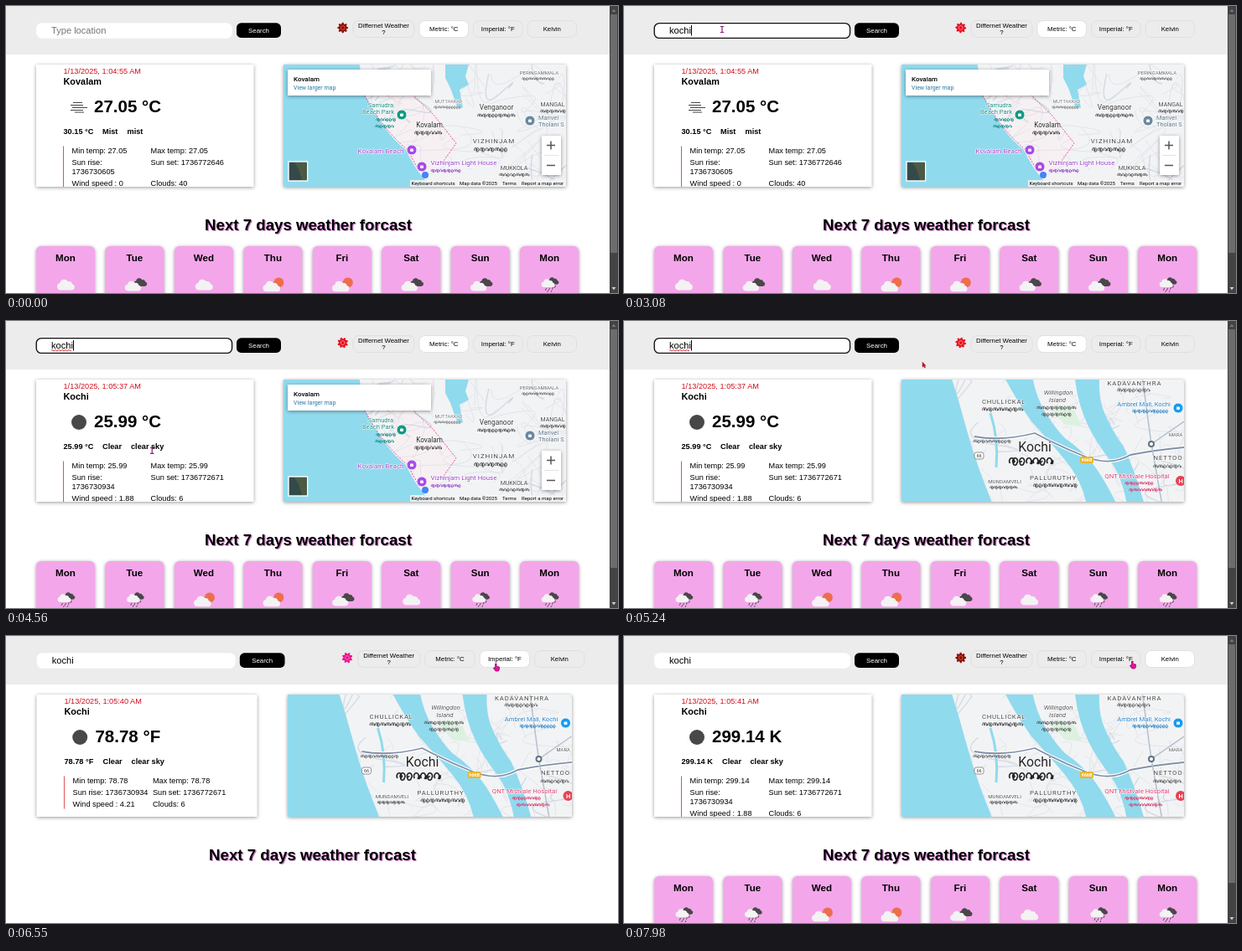
Animation of 730x343 px, one loop 8 s. Source, as an HTML page:

```html
<!DOCTYPE html>
<html lang="en">
<head>
<meta charset="utf-8">
<title>Weather dashboard</title>
<style>
html, body { margin: 0; width: 100%; height: 100%; overflow: hidden; background: #fff; }
svg { display: block; font-family: "Liberation Sans", Arial, sans-serif; }
.card { filter: drop-shadow(0 1px 2px rgba(0,0,0,.4)); }
.map text { font-family: Roboto, sans-serif; }
.halo text { paint-order: stroke; stroke: #fff; stroke-width: 1.2px; stroke-linejoin: round; }
</style>
</head>
<body>
<svg width="730" height="343" viewBox="0 0 730 343">
  <defs><clipPath id="weatherClip"><rect x="30" y="60" width="280" height="156"/></clipPath></defs>
  <g id="scene"></g>
  <g id="sun"></g>
  <g id="cursor"></g>
</svg>
<script>
const LOOP = 8000;
const $ = id => document.getElementById(id);
const DAYS = ['Mon', 'Tue', 'Wed', 'Thu', 'Fri', 'Sat', 'Sun', 'Mon'];

// ---- drawing helpers ----
const text = (x, y, str, size, extra = '') => `<text x="${x}" y="${y}" font-size="${size}" ${extra}>${str}</text>`;
const rect = (x, y, w, h, fill, extra = '') => `<rect x="${x}" y="${y}" width="${w}" height="${h}" fill="${fill}" ${extra}/>`;
const dot = (x, y, r, fill, extra = '') => `<circle cx="${x}" cy="${y}" r="${r}" fill="${fill}" ${extra}/>`;
const line = (d, color, width = 1, extra = '') => `<path d="${d}" fill="none" stroke="${color}" stroke-width="${width}" ${extra}/>`;
const shape = (d, fill, extra = '') => `<path d="${d}" fill="${fill}" ${extra}/>`;
const BOLD = 'font-weight="700"', MID = 'text-anchor="middle"';

function random(seed) {
  return () => (seed = (seed * 16807) % 2147483647) / 2147483647;
}

// Rounded looping script, used for the second language of the map labels
function curls(x, y, w, h = 4, color = '#555') {
  const rnd = random(Math.round(x * 31 + y * 7));
  const r = h / 2.7;
  let d = '';
  for (let px = x - w / 2; px < x + w / 2 - r * 2;) {
    const arches = rnd() < .5 ? 2 : 1;
    d += `M${px} ${y}`;
    for (let i = 0; i < arches; i++) d += `a${r * .75} ${r} 0 1 1 ${r * 1.1} 0`;
    d += rnd() < .6 ? `a${r * .6} ${r * .6} 0 1 1 ${-r * .5} ${-r * .6}` : `q${r * .7} ${r * .5} ${r * .6} ${-r}`;
    px += r * (arches * 1.1 + 1.1);
  }
  return line(d, color, Math.max(.8, h * .16));
}

function label(x, y, str, size, color = '#444', extra = '') {
  return text(x, y, str, size, `${MID} fill="${color}" ${extra}`);
}

function roads(seed, count, color, width) {
  const rnd = random(seed);
  let d = '';
  for (let i = 0; i < count; i++) {
    const step = () => (rnd() - .5) * 60;
    d += `M${330 + rnd() * 350} ${65 + rnd() * 155}q${step()} ${step()} ${step()} ${step()}t${step()} ${step()}`;
  }
  return line(d, color, width);
}

function pin(x, y, color, r = 6) {
  return dot(x, y, r, color, 'stroke="#fff" stroke-width=".8"') + rect(x - 2, y - 1.5, 4, 3.5, '#fff', 'rx="1"');
}

// ---- maps ----
const WATER = '#90daee';
const PURPLE = '#9b45c9', TEAL = '#168c83';
const land = rect(320, 60, 370, 160, '#f2f3f5');

const kovalamMap = land +
  shape('M455 107L482 103 510 130 537 164 520 190 500 205 470 170Z', '#f7f0f3') +
  roads(41, 75, '#e0e3e8', .9) + roads(8, 14, '#d3d9e1', 1.4) +
  shape('M320 60H420L428 107Q440 130 452 146T477 172Q488 195 497 204L508 220H320Z', WATER) +
  shape('M524 66H553L548 84 552 94 541 100 545 122 538 120 530 98 524 86Z', WATER) +
  line('M428 107Q442 133 455 148T479 172L492 196M455 107L482 103 510 130 537 164 520 188', '#e33f91', .9, 'stroke-dasharray="2 1.5"') +
  '<g class="halo">' +
  label(505, 145, 'Kovalam', 8.2, '#222') + curls(505, 153, 34, 5, '#333') +
  label(528, 116, 'MUTTAKKAD', 5.6, '#777') + curls(528, 122, 34, 3.6, '#888') +
  label(636, 82, 'PERINGAMMALA', 6, '#666') + curls(636, 88, 40, 3.8, '#777') +
  label(585, 124, 'Venganoor', 8.4, '#333') + curls(585, 132, 44, 4.6, '#444') +
  label(582, 164, 'VIZHINJAM', 8, '#444', 'letter-spacing=".9"') + curls(581, 173, 44, 5.5, '#333') +
  label(652, 120, 'MANGAL', 7) + curls(653, 127, 30, 4.4) +
  label(606, 196, 'MUKKOLA', 7) + curls(606, 203, 34, 4.4) +
  text(635, 136, 'Marivel', 7.4, 'fill="#587185"') + text(635, 144, 'Tholani S', 7.4, 'fill="#587185"') +
  label(447, 121, 'Samudra', 7.6, TEAL) + label(444, 129, 'Beach Park', 7.6, TEAL) +
  curls(453, 137, 22, 4.2, TEAL) + curls(453, 145, 24, 4.2, TEAL) +
  label(447, 176, 'Kovalam Beach', 8, PURPLE) +
  label(546, 190, 'Vizhinjam Light House', 7.9, PURPLE) + curls(526, 198, 37, 4.2, PURPLE) +
  '</g>' +
  pin(472, 130, '#129a83') + pin(484, 172, '#a94be6') + pin(496, 192, '#a94be6') + pin(625, 137, '#6b899e') +
  dot(500, 202, 4, '#4285f4') +
  rect(336, 76, 171, 31, '#fff', 'class="card"') +
  text(343, 90, 'Kovalam', 8, 'font-weight="500"') +
  text(343, 100, 'View larger map', 7, 'fill="#2377a8"') +
  rect(639, 155, 23, 47, '#fff', 'class="card"') +
  line('M645 166.5h10M650 161.5v10M645 190.5h10', '#555', 1.5) + line('M642 178.5h17', '#e2e2e2') +
  rect(337, 186, 22.5, 23, '#34494a', 'stroke="#fff" stroke-width="1.4"') +
  shape('M344 187l5 8 4 13h6v-21z', '#4c5a43') +
  rect(482, 208, 190, 9, '#f5f5f5', 'opacity=".85"') +
  text(483.5, 214, 'Keyboard shortcuts', 6) + text(541, 214, 'Map data ©2025', 6) +
  text(592, 214, 'Terms', 6) + text(615, 214, 'Report a map error', 6);

const highway = 'M418 138Q450 144 490 134Q520 150 550 162T604 160Q640 153 680 150';
const kochiMap = land +
  roads(77, 70, '#e1e4e9', .9) + roads(19, 12, '#d6dce4', 1.4) +
  shape('M320 60H388Q398 90 406 120T424 178L440 220H320Z', WATER) +
  shape('M450 60H486Q490 88 502 108T526 140Q552 158 566 180T588 220H552Q546 190 526 166T486 120Q466 92 450 60Z', WATER) +
  shape('M537 60H568Q564 90 574 112T596 150Q610 180 621 220H600Q594 185 578 164T554 126Q540 98 537 60Z', WATER) +
  shape('M508 104q16-8 30 4l8 18-20-2z', '#dcf1df') +
  line('M437 110Q447 140 444 175', WATER, 3) +
  line(highway, '#fff', 4) + line(highway, '#7f91a8', 1.8) +
  line('M629 147L642 220M618 66L629 147 668 120', '#b4c0ce', 1.5) +
  '<g class="halo">' +
  label(453, 99, 'CHULLICKAL', 7.8, '#444', 'letter-spacing=".65"') + curls(454, 107, 52, 5.2, '#333') +
  label(609, 77, 'KADAVANTHRA', 7.8, '#444', 'letter-spacing=".9"') + curls(609, 84, 40, 4.8) +
  label(518, 88, 'Willingdon', 7.7, '#555', 'font-style="italic"') + label(517, 97, 'Island', 7.7, '#555', 'font-style="italic"') +
  curls(516, 105, 46, 4.6) + curls(517, 113, 36, 4.6) +
  label(490, 155.5, 'Kochi', 15.8, '#222') + curls(488, 170, 55, 10, '#222') +
  curls(439, 145, 44, 4.3, '#666') +
  label(512, 189.5, 'PALLURUTHY', 7.8, '#444', 'letter-spacing=".85"') + curls(515, 198, 52, 5.2, '#333') +
  label(454, 193.5, 'MUNDAMVELI', 6.2, '#555') + curls(454, 200, 34, 4) +
  label(649, 166, 'NETTOO', 7.8, '#444', 'letter-spacing=".8"') + curls(650, 175, 36, 4.8) +
  text(650, 138, 'MARA', 5.8, 'fill="#555"') +
  label(620, 102, 'Ambrel Mall, Kochi', 7.7, '#2680c4') + curls(630, 109, 46, 4.4, '#2680c4') +
  label(612, 188, 'QNT Mistvale Hospital', 7.8, '#dc3d72') + curls(616, 195, 36, 4.2, '#dc3d72') + curls(624, 203, 42, 4.2, '#dc3d72') +
  '</g>' +
  rect(418, 157, 11, 8, '#fff', 'rx="2.5" stroke="#777" stroke-width=".8"') + label(423.5, 163, '66', 5.5, '#333') +
  rect(544, 162, 16, 8, '#eab429', 'rx="2"') + label(552, 168, '966B', 5.5, '#fff', BOLD) +
  dot(629, 147, 4, '#62717f') + dot(629, 147, 2, '#fff') +
  pin(661, 104, '#169cf0') + dot(664, 191, 6, '#ea4052') + text(661.5, 194, 'H', 7.5, `${BOLD} fill="#fff"`);

// ---- weather icons, centred on 0,0 ----
const cloud = (x, y, scale, fill) =>
  shape('M-6.5 6.5a4.3 4.3 0 0 1-.6-8.5a5.2 5.2 0 0 1 9.6-1.8a3.8 3.8 0 0 1 5 3a3.7 3.7 0 0 1-.8 7.3z', fill,
    `transform="translate(${x} ${y}) scale(${scale})"`);
const ICONS = {
  cloud: cloud(0, 0, 1, '#f3f3f3'),
  broken: cloud(6.5, -3, .75, '#484848') + cloud(-2.5, 1.5, .92, '#f3f3f3'),
  few: dot(6.5, -2.5, 6, '#ec6e4c') + cloud(-2, 2, .98, '#f3f3f3'),
  rain: cloud(4, -4.5, .66, '#484848') + cloud(-2, -2, .75, '#f3f3f3') +
    line('M-4 4l-1.3 3M0 4l-1.3 3M4 3l-1.3 3M7 1l-1.3 3M-2 7l-1 2M2.5 7l-1 2', '#555', 1)
};
const KOVALAM_DAYS = ['cloud', 'broken', 'cloud', 'few', 'few', 'broken', 'broken', 'rain'];
const KOCHI_DAYS = ['rain', 'rain', 'few', 'few', 'broken', 'cloud', 'rain', 'rain'];

// ---- readings, from the time each one arrives ----
const kochi = (at, clock, temp, wind, gap) => ({
  at, clock, temp, wind, gap, place: 'Kochi', feels: temp, sky: ['Clear', 'clear sky'],
  rise: 1736730934, set: 1736772671, clouds: 6, days: KOCHI_DAYS
});
const READINGS = [
  { at: 0, clock: '1:04:55', place: 'Kovalam', temp: '27.05 °C', feels: '30.15 °C', wind: 0, sky: ['Mist', 'mist'],
    gap: [115, 144.5], rise: 1736730605, set: 1736772646, clouds: 40, days: KOVALAM_DAYS },
  kochi(3760, '1:05:37', '25.99 °C', 1.88, [115, 149]),
  kochi(6100, '1:05:40', '78.78 °F', 4.21, [114, 147.5]),
  kochi(7460, '1:05:41', '299.14 K', 1.88, [117, 150.5])
];
const LOADING = [[3610, 4100], [6030, 6620], [7380, 7750]];
const KEYS = [2390, 2640, 2770, 2900, 3080];
const since = (t, times) => times.filter(at => t >= at).length;

function stateAt(t) {
  return {
    reading: since(t, READINGS.map(r => r.at)) - 1,
    wide: LOADING.some(([from, to]) => t >= from && t < to),
    typed: 'kochi'.slice(0, since(t, KEYS)),
    focus: t >= 1390 && t < 5860,
    caret: t < 1930 || t >= 2390,
    misspelt: t >= 3700 && t < 5860,
    unit: since(t, [5860, 7300]),
    moved: t >= 4800
  };
}

function header(s, X) {
  let out = rect(0, 0, 730, 58, '#ececec');
  out += s.focus
    ? rect(X(36.2), 20.6, X(233.4), 17.8, '#fff', 'rx="6" stroke="#111" stroke-width="1.4"')
    : rect(X(36), 20.2, X(234), 18.5, '#fff', 'rx="7"');
  out += s.typed ? text(X(54), 33, s.typed, 11.1) : text(X(54), 33, 'Type location', 11.1, 'fill="#757575"');
  if (s.misspelt) out += line(`M${X(54)} 35.2` + 'q1 -1.6 2 0t2 0'.repeat(6), '#d3202e', .9);
  if (s.focus && s.caret) out += rect(X(54) + [0, 5.6, 11.7, 17.3, 23.5, 26][s.typed.length], 23, 1, 12.5, '#000');
  out += rect(X(275), 20.3, X(53), 17.6, '#000', 'rx="5.5"') + text(X(301.5), 32, 'Search', 7.9, `${MID} fill="#fff"`);
  const button = (x, w, active, ...rows) => rect(X(x), 17.5, X(w), 20, active ? '#fff' : '#ececec', 'rx="7" stroke="#dcdcdc" stroke-width=".8"') +
    rows.map((row, i) => text(X(x + w / 2), rows.length > 1 ? 25.8 + i * 8.2 : 30, row, 7.8, MID)).join('');
  return out + button(414, 73, false, 'Differnet Weather', '?') +
    ['Metric: °C', 'Imperial: °F', 'Kelvin'].map((name, i) => button(493 + i * 64.5, 58.5, s.unit === i, name)).join('');
}

function weather(s, X) {
  const r = READINGS[s.reading];
  const cell = (x, y, str) => text(X(x), y, str, 9.2);
  const unit = parseFloat(r.temp).toFixed(2);
  const last = s.wide ? 203.5 : 214.5;
  return rect(X(36), 70, X(259.5), 146, '#fff', 'class="card"') + '<g clip-path="url(#weatherClip)">' +
    text(X(68.5), 81.3, `1/13/2025, ${r.clock} AM`, 9.2, 'fill="#d00c1b"') +
    text(X(68.5), 94, r.place, 10.9, BOLD) + text(X(105), 127, r.temp, 20.5, BOLD) +
    (s.reading ? dot(X(87), 121, 9, '#484848')
      : line('M80 115.5h11M77 118.5h15M79 121.5h18M77 124.5h15M82 127h11', '#444', 1.1)) +
    text(X(68.5), 153.3, r.feels, 9.2, BOLD) + r.sky.map((sky, i) => text(X(r.gap[i]), 153.3, sky, 9.2, BOLD)).join('') +
    rect(X(68), 167.5, 1, s.wide ? 39 : 48.5, '#e05252') +
    cell(78.5, 176, `Min temp: ${unit}`) + cell(172.5, 176, `Max temp: ${unit}`) +
    cell(78.5, 190, s.wide ? `Sun rise: ${r.rise}` : 'Sun rise:') + cell(172.5, 190, `Sun set: ${r.set}`) +
    (s.wide ? '' : cell(78.5, 201, r.rise)) +
    cell(78.5, last, `Wind speed : ${r.wind}`) + cell(172.5, last, `Clouds: ${r.clouds}`) + '</g>';
}

function mapPanel(s) {
  const [x, w, shift] = s.wide ? [336, 339, 6.5] : [331, 337, 0];
  return rect(x, 70, w, 146, '#fff', 'class="card"') +
    `<svg class="map" x="${x}" y="70" width="${w}" height="146" viewBox="${x - shift} 70 ${w} 146">${s.moved ? kochiMap : kovalamMap}</svg>`;
}

function forecast(s) {
  const days = READINGS[s.reading].days;
  return DAYS.map((day, i) => {
    const x = 36 + i * 82.45;
    return rect(x, 287, 70, 70, '#f4a6ea', 'rx="6" class="card"') + text(x + 35, 304.5, day, 11.6, `${BOLD} ${MID}`) +
      `<g transform="translate(${x + 35.5} 333)">${ICONS[days[i]]}</g>`;
  }).join('');
}

const scrollbar = rect(720, 0, 10, 343, '#434343') + rect(721, 10, 8, 285, '#6c6c6c') +
  shape('M722.5 7l2.5-3.5 2.5 3.5z', '#777') + shape('M722.5 336l2.5 3.5 2.5-3.5z', '#ccc');

function scene(s) {
  const X = x => s.wide ? x * 730 / 720 : x;
  const title = (offset, fill) => text(X(360.5) + offset, 268 + offset, 'Next 7 days weather forcast', 18.67, `${BOLD} ${MID} fill="${fill}"`);
  return header(s, X) + weather(s, X) + mapPanel(s) + title(1.2, '#cf7fcb') + title(0, '#000') +
    (s.wide ? '' : forecast(s) + scrollbar);
}

// ---- pointer: time, x, y ----
const PATH = [
  [870, 300, 150], [1190, 127, 36], [1390, 117, 28], [4290, 117, 28], [4560, 174, 155], [4800, 235, 118],
  [5080, 340, 62], [5240, 356, 52], [5690, 560, 36], [5860, 585, 37], [6600, 585, 37], [7050, 645, 30],
  [7450, 645, 30], [7980, 607, 34]
];
const POINTERS = {
  beam: line('M-2.2-3.5H2.2M0-3.5V3.5M-2.2 3.5H2.2', '#8e1c72', 1.2),
  arrow: shape('M-.5-3V3.2L1 2 2.1 4.2 3.2 3.7 2.1 1.5H3.8Z', '#c8142f', 'stroke="#7a0a1c" stroke-width=".3"'),
  hand: shape('M-1.5-4h1.6v3l3.4 1v3l-1.2 2h-3.2l-2.8-3.4 1-1 1.2 1z', '#f00fa0', 'stroke="#5a0a45" stroke-width=".6"')
};

function pointerAt(t) {
  const i = PATH.findIndex(p => p[0] > t);
  if (i === 0) return null;
  if (i < 0) return PATH[PATH.length - 1].slice(1);
  const [a, b] = [PATH[i - 1], PATH[i]];
  const u = (t - a[0]) / (b[0] - a[0]);
  return [a[1] + (b[1] - a[1]) * u, a[2] + (b[2] - a[2]) * u];
}

function pointerKind([x, y]) {
  if (y > 17 && y < 39 && x > 414) return 'hand';
  const inField = y > 20 && y < 39 && x > 36 && x < 270;
  const inText = y > 145 && y < 215 && x > 68 && x < 265;
  return inField || inText ? 'beam' : 'arrow';
}

function sunMarkup(color, core) {
  let rays = '';
  for (let i = 0; i < 8; i++) rays += `<path d="M-2-3L-.8-6.3H.8L2-3Z" transform="rotate(${i * 45})"/>`;
  return `<g fill="${color}">${rays}</g>` + dot(0, 0, 4.4, color) + dot(0, 0, 2.4, color, `stroke="${core}" stroke-width=".8"`);
}
const SUNS = [sunMarkup('#8f0b0b', '#c8782c'), sunMarkup('#e8101f', '#f79aa5'), sunMarkup('#f01290', '#e58ad0')];

const shown = {};
function put(id, markup) {
  if (shown[id] !== markup) $(id).innerHTML = shown[id] = markup;
}

let lastKey;
function draw(t) {
  const s = stateAt(t);
  const key = JSON.stringify(s);
  if (key !== lastKey) put('scene', scene(s));
  lastKey = key;

  put('sun', SUNS[s.focus ? 1 : s.unit === 1 ? 2 : 0]);
  $('sun').setAttribute('transform', `translate(${s.wide ? 407 : 401.7} 26) rotate(${t * 360 / LOOP})`);

  const p = pointerAt(t);
  put('cursor', p ? POINTERS[pointerKind(p)] : '');
  if (p) $('cursor').setAttribute('transform', `translate(${p})`);
}

const start = performance.now();
function tick() {
  draw((performance.now() - start) % LOOP);
  requestAnimationFrame(tick);
}
tick();
</script>
</body>
</html>
```
